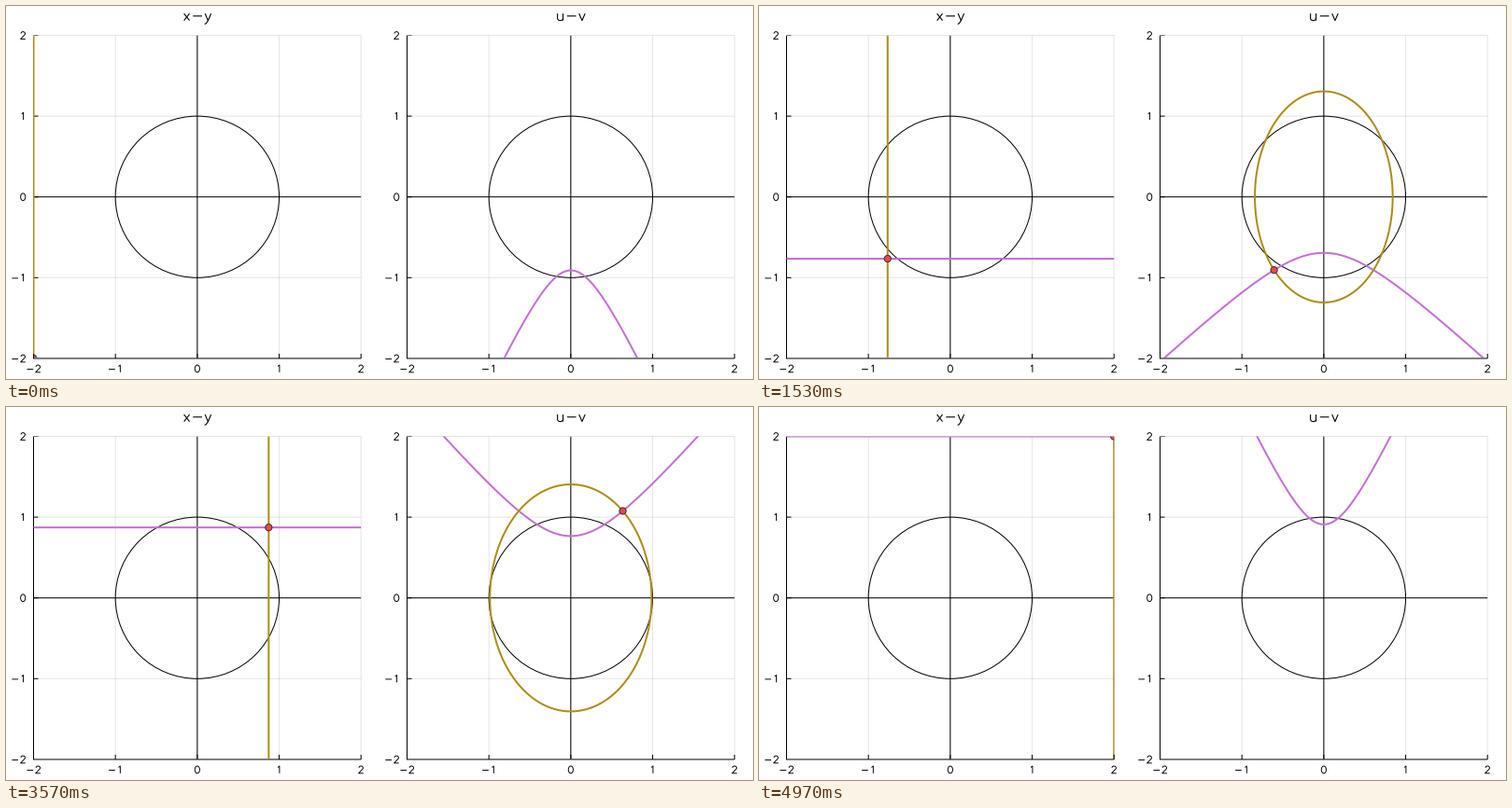
Animation, 800 px wide and 400 px high, one loop 5.01 s. Source, as a matplotlib script:

```python
import numpy as np
import matplotlib.pyplot as plt
from matplotlib.animation import FuncAnimation
from matplotlib.collections import LineCollection
from matplotlib.patches import Circle, Ellipse, Rectangle

plt.rcParams["path.snap"] = False

W, H, DPI = 800, 400, 100
PX = 72 / DPI                      # one pixel in points
TOP, BOTTOM, SIDE = 31.5, 377.95, 350.7
LEFTS = (29.5, 429.5)
STEPS = 150
TICK_MS, LOOP_MS = 10, 5010
PURPLE, GOLD, RED = "#c271d2", "#ac8d18", "#f2464d"


def arc(cx, cy, rx, ry, start, end):
    t = np.radians(np.linspace(start, end, 25))
    return [*zip(cx + rx * np.cos(t), cy + ry * np.sin(t))]


# Single-stroke letters: advance width, then strokes with y up from the baseline
VEE = [(2, 14), (8, 0), (14, 14)]
GLYPHS = {
    "0": (20, [arc(10, 10.5, 7, 10.5, 0, 360)]),
    "1": (20, [[(6, 17), (11, 21), (11, 0)]]),
    "2": (20, [arc(10, 15.5, 6, 5.5, 175, -30) + [(3, 0), (17, 0)]]),
    "-": (26, [[(4, 9), (22, 9)]]),
    "u": (19, [[(4, 14)] + arc(9.5, 4.5, 5.5, 4.5, 180, 360), [(15, 14), (15, 0)]]),
    "v": (16, [VEE]),
    "x": (17, [[(3, 14), (14, 0)], [(14, 14), (3, 0)]]),
    "y": (16, [VEE, [(8, 0), (4, -6), (1, -7)]]),
}

fig = plt.figure(figsize=(W / DPI, H / DPI), dpi=DPI, facecolor="white")
ax = fig.add_axes([0, 0, 1, 1])
ax.set_xlim(0, W)
ax.set_ylim(H, 0)
ax.axis("off")


def to_px(left, x, y):
    """Plane coordinates in [-2, 2] to stage pixels."""
    return left + (x + 2) * SIDE / 4, BOTTOM - (y + 2) * (BOTTOM - TOP) / 4


def strokes(text, x, base, scale, align):
    """Stroke polylines of a text; align 0.5 centres it, 1 ends it at x."""
    x -= align * scale * sum(GLYPHS[c][0] for c in text)
    out = []
    for c in text:
        adv, lines = GLYPHS[c]
        out += [[(x + scale * gx, base - scale * gy) for gx, gy in ln] for ln in lines]
        x += scale * adv
    return out


def add_lines(segs, color, width, z):
    ax.add_collection(LineCollection(segs, colors=color, linewidths=width * PX, zorder=z),
                      autolim=False)


def box(x0, y0, x1, y1, **style):
    return Rectangle((x0, y0), x1 - x0, y1 - y0, transform=ax.transData, **style)


def clipped(artist, left):
    artist.set_clip_path(box(left - 4, TOP - 4, left + SIDE + 4, BOTTOM + 4))
    return artist


def curve(left, color, z):
    line, = ax.plot([], [], color=color, lw=2 * PX, zorder=z, solid_capstyle="butt")
    return clipped(line, left)


def dot(left):
    patch = Circle((-50, -50), 3.6, fc=RED, ec="#333333", lw=PX, zorder=5)
    return clipped(ax.add_patch(patch), left)


inner, edges, y_axes, x_axes, cross, labels, titles = ([] for _ in range(7))
for left, title in zip(LEFTS, ("x-y", "u-v")):
    right = left + SIDE
    for n in range(-2, 3):
        x, y = to_px(left, n, n)
        grid = edges if n == 2 else inner
        if n > -2:
            grid += [[(x, TOP), (x, BOTTOM)], [(left, y), (right, y)]]
        x_axes.append([(x, BOTTOM), (x, BOTTOM - 5)])
        y_axes.append([(left, y), (left + 5, y)])
        labels += strokes(str(n), x, 392.8, 0.37, 0.5)
        labels += strokes(str(n), left - 7.6, y + 3.9, 0.37, 1)
    y_axes.append([(left, TOP), (left, BOTTOM)])
    x_axes.append([(left - 0.5, BOTTOM), (right, BOTTOM)])
    cx, cy = to_px(left, 0, 0)
    cross += [[(left, cy), (right, cy)], [(cx, TOP), (cx, BOTTOM)]]
    titles += strokes(title, cx, 15.6, 0.537, 0.5)
    ax.add_patch(Ellipse((cx, cy), SIDE / 2, (BOTTOM - TOP) / 2, fill=False, ec="black",
                         lw=PX, zorder=2))

add_lines(inner, (0, 0, 0, 0.1), 1, 1)
add_lines(y_axes + cross, "black", 1, 2)

# White margins cut the curves off at the plot edges
starts = [left - 0.5 for left in LEFTS] + [W]
ends = [0] + [left + SIDE + 0.3 for left in LEFTS]
margins = [(0, 0, W, TOP), (0, BOTTOM - 1, W, H)]
margins += [(x0, 0, x1, H) for x0, x1 in zip(ends, starts)]
for margin in margins:
    ax.add_patch(box(*margin, fc="white", lw=0, zorder=6))

add_lines(edges, (0, 0, 0, 0.1), 1, 7)
add_lines(x_axes, "black", 1, 7)
add_lines(labels, "black", 0.95, 8)
add_lines(titles, "black", 1.1, 8)

z_left, w_left = LEFTS
h_line, v_line = curve(z_left, PURPLE, 3), curve(z_left, GOLD, 4)
h_image = curve(w_left, PURPLE, 3)
v_images = [curve(w_left, GOLD, 4) for _ in range(3)]
z_dot, w_dot = dot(z_left), dot(w_left)

span = np.linspace(-4, 4, 241)
turn = np.linspace(-np.pi, np.pi, 241)
full = np.array([-2.0, 2.0])


def sinh_map(x, y):
    return np.sinh(x) * np.cos(y), np.cosh(x) * np.sin(y)


def update(i):
    k = min(int((i + 0.5) * 0.3), STEPS - 1)
    a = -2 + 4 * k / (STEPS - 1)
    h_line.set_data(*to_px(z_left, full, np.full(2, a)))
    v_line.set_data(*to_px(z_left, np.full(2, a), full))
    h_image.set_data(*to_px(w_left, *sinh_map(span, a)))
    oval = to_px(w_left, *sinh_map(a, turn))
    for n, line in enumerate(v_images):
        line.set_data(*oval)
        # an oval cut by the frame is stroked repeatedly and looks heavier
        line.set_visible(n == 0 or np.cosh(a) > 2)
    z_dot.center = to_px(z_left, a, a)
    w_dot.center = to_px(w_left, *sinh_map(a, a))
    return h_line, v_line, h_image, *v_images, z_dot, w_dot


anim = FuncAnimation(fig, update, frames=LOOP_MS // TICK_MS, interval=TICK_MS,
                     repeat=True, repeat_delay=0, cache_frame_data=False)
plt.show()
```
